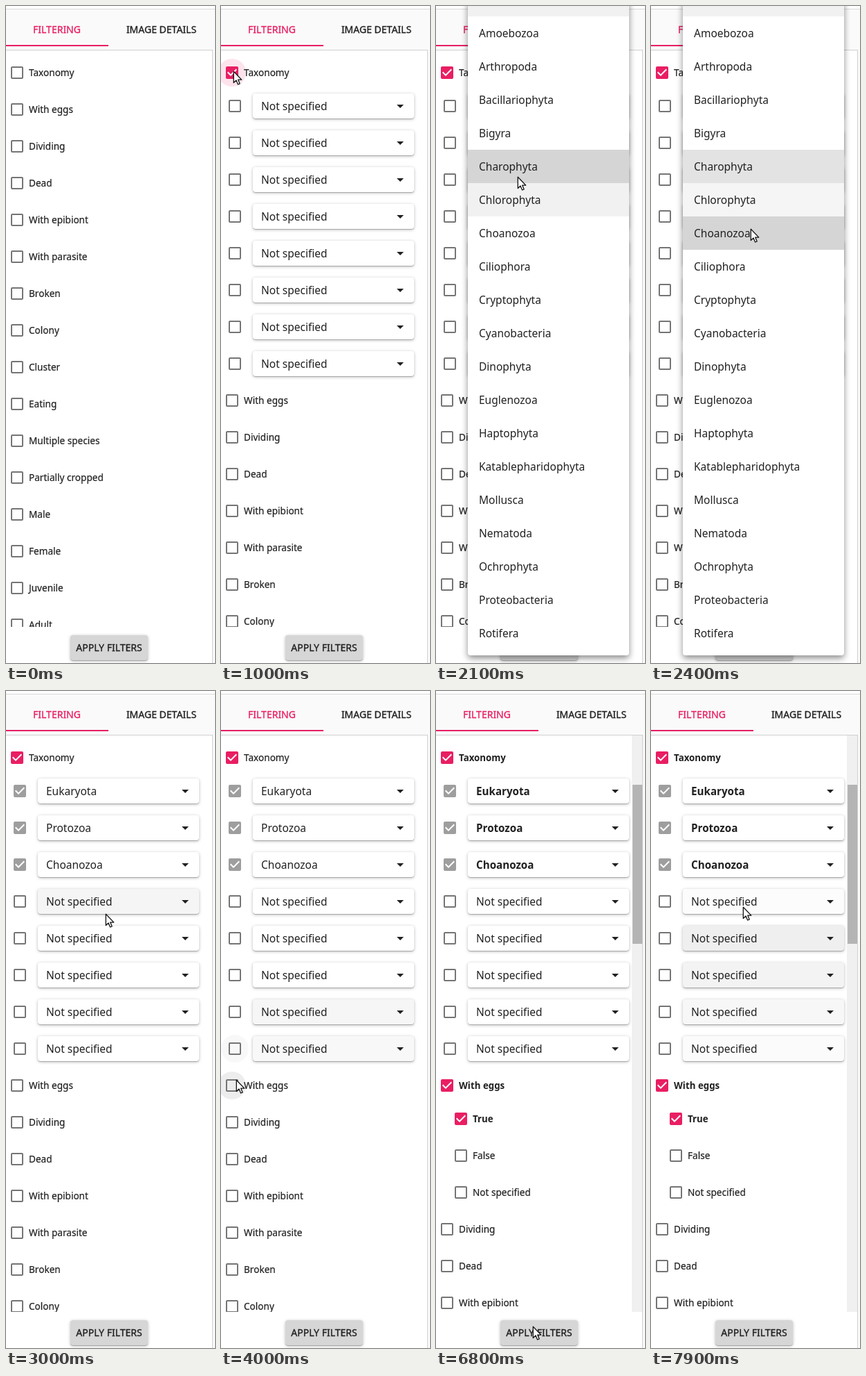
Animation, 302 px wide and 946 px high, one loop 8 s. Source, as an HTML page:

```html
<!DOCTYPE html>
<html lang="en">
<head>
<meta charset="utf-8">
<title>Filter panel</title>
<style>
  html, body { margin: 0; height: 100%; overflow: hidden; background: #fff; }
  svg { display: block; width: 100vw; height: 100vh; }
  text { font-family: "Noto Sans", "Open Sans", sans-serif; fill: #212121; white-space: pre; }
  .label { font-size: 13.6px; stroke: #212121; stroke-width: .2px; }
  .choice { font-size: 15.5px; }
  .label.bold { font-size: 13.3px; font-weight: 700; stroke: none; }
  .choice.bold { font-size: 15.2px; font-weight: 700; }
  .caps { font-size: 14px; font-weight: 500; text-anchor: middle; stroke: #212121; stroke-width: .35px; }
  .caps.on { fill: #e91e63; stroke: #e91e63; }
  .raised { filter: drop-shadow(0 1px .5px rgba(0,0,0,.2)) drop-shadow(0 1px 2px rgba(0,0,0,.28)); }
  .menu { filter: drop-shadow(0 4px 5px rgba(0,0,0,.45)); }
</style>
</head>
<body>
<svg id="stage" viewBox="0 0 302 946" preserveAspectRatio="none"></svg>
<script>
const LOOP = 8000, STEP = 100, PINK = '#e91e63';
const stage = document.getElementById('stage');

const filters = ['Taxonomy', 'With eggs', 'Dividing', 'Dead', 'With epibiont', 'With parasite',
  'Broken', 'Colony', 'Cluster', 'Eating', 'Multiple species', 'Partially cropped',
  'Male', 'Female', 'Juvenile', 'Adult'];
const answers = ['True', 'False', 'Not specified'];
const ranks = ['Eukaryota', 'Protozoa', 'Choanozoa'];
const phyla = ['Amoebozoa', 'Arthropoda', 'Bacillariophyta', 'Bigyra', 'Charophyta', 'Chlorophyta',
  'Choanozoa', 'Ciliophora', 'Cryptophyta', 'Cyanobacteria', 'Dinophyta', 'Euglenozoa', 'Haptophyta',
  'Katablepharidophyta', 'Mollusca', 'Nematoda', 'Ochrophyta', 'Proteobacteria', 'Rotifera'];

// Moments at which the state switches.
const at = { enter: 300, taxonomy: 1000, menu: 1850, chosen: 2985, eggs: 4300, yes: 4900,
  scrollbar: 6000, press: 6500, applied: 6800 };

// Pointer moves: from time, to time, x, y. It rests in between.
const moves = [
  [300, 800, 18, 94], [1400, 1550, 40, 112], [1550, 1600, 90, 186], [1600, 1800, 118, 262],
  [1850, 1960, 118, 246], [2260, 2300, 144, 321], [3400, 3700, 80, 490], [3700, 3780, 36, 520],
  [3780, 3880, 22, 525], [3880, 3940, 22, 560], [4600, 4800, 36, 614], [5000, 5100, 30, 664],
  [5300, 5450, 58, 720], [5900, 6200, 112, 913], [6400, 6500, 140, 915], [7300, 7600, 139, 574],
  [7720, 7900, 133, 311]];

const clamp = v => Math.max(0, Math.min(1, v));
const menuOpen = t => t >= at.menu && t < at.chosen;

function pointerAt(t) {
  let x = 170, y = 2;
  for (const [from, to, mx, my] of moves) {
    const k = clamp((t - from) / (to - from));
    x += (mx - x) * k;
    y += (my - y) * k;
  }
  return { t, x, y };
}

// Recent pointer positions; every hover fade follows from them.
const DT = 5;
let trail = [];
function follow(t) {
  trail = [];
  for (let s = Math.max(at.enter, t - 700); s < t; s += DT) trail.push(pointerAt(s));
}

const hover = (inside, fall = 400, rise = 60) =>
  trail.reduce((v, p) => clamp(v + (inside(p) ? DT / rise : -DT / fall)), 0);
const inRow = (p, y, h) => p.x >= 46 && p.x <= 279 && Math.abs(p.y - y) <= h / 2;

function grey(level) {
  const v = Math.round(255 - 42 * level);
  return `rgb(${v},${v},${v})`;
}

const rect = (x, y, w, h, fill, more = '') =>
  `<rect x="${x}" y="${y}" width="${w}" height="${h}" fill="${fill}" ${more}/>`;
const text = (x, y, str, cls, bold) => `<text x="${x}" y="${y}" class="${cls}${bold ? ' bold' : ''}">${str}</text>`;

function checkbox(x, y, fill) {
  const near = p => Math.hypot(p.x - x, p.y - y) < 23 && !menuOpen(p.t);
  const alpha = fill ? .12 * hover(near) : .07 * hover(near, 150);
  const halo = alpha ? `<circle cx="${x}" cy="${y}" r="20" fill="${fill || '#000'}" fill-opacity="${alpha}"/>` : '';
  return halo + (fill
    ? rect(x - 9, y - 9, 18, 18, fill, 'rx="2"') +
      `<path transform="translate(${x} ${y})" fill="#fff" d="M-2 5l-5-5 1.41-1.41L-2 2.17l7.59-7.59L7-4z"/>`
    : rect(x - 8, y - 8, 16, 16, 'none', 'rx="1" stroke="#757575" stroke-width="2"'));
}

const option = (x, y, str, checked, bold) =>
  checkbox(x, y, checked && PINK) + text(x + 17, y + 5.3, str, 'label', bold);

function select(i, y, t) {
  const set = t >= at.chosen && i < ranks.length;
  const tint = hover(p => inRow(p, y, 36) && !menuOpen(p.t) && p.t >= at.taxonomy);
  return checkbox(20, y, set && '#9e9e9e') +
    rect(46, y - 18, 233, 36, grey(tint), 'rx="4" class="raised"') +
    text(58, y + 5.7, set ? ranks[i] : 'Not specified', 'choice', set && t >= at.applied) +
    `<path d="M254 ${y - 2}h10l-5 5z" fill="#212121"/>`;
}

function list(t) {
  const applied = t >= at.applied;
  let out = '', y = 96;
  filters.forEach((name, i) => {
    const open = i === 0 ? t >= at.taxonomy : i === 1 && t >= at.eggs;
    out += option(16, y, name, open, open && applied);
    if (open) {
      y -= 5;
      if (i === 0) for (let k = 0; k < 8; k++) out += select(k, y += 53, t);
      else answers.forEach((s, k) => {
        const on = k === 0 && t >= at.yes;
        out += option(36, y += 53, s, on, on && applied);
      });
    }
    y += 53;
  });
  return out;
}

function menu(t) {
  if (!menuOpen(t)) return '';
  const rows = phyla.map((name, i) => {
    const y = 39 + 48 * i;
    const tint = hover(p => inRow(p, y, 48) && menuOpen(p.t));
    return rect(46, y - 24, 233, 48, grey(tint)) + text(62, y + 5.5, name, 'choice');
  }).join('');
  return `<g opacity="${t - at.menu < STEP ? .6 : 1}">` +
    rect(46, -20, 233, 955, '#fff', 'rx="4" class="menu"') +
    `<g clip-path="url(#sheet)">${rect(46, -20, 233, 35, '#f1f1f1')}${rows}</g></g>`;
}

function pointer(t) {
  if (t < at.enter) return '';
  const { x, y } = pointerAt(t);
  return `<path transform="translate(${x} ${y})" fill="#fff" stroke="#111" stroke-width="1.3"
    stroke-linejoin="round" d="M.3.3V16.5L4 13 6.6 19 9.2 17.9 6.7 12.1H11.8Z"/>`;
}

function draw(t) {
  follow(t);
  const pressed = t >= at.press && t < at.applied;
  stage.innerHTML =
    `<defs><clipPath id="list"><rect y="64" width="298" height="830"/></clipPath>
     <clipPath id="sheet"><rect x="46" y="-20" width="233" height="955" rx="4"/></clipPath></defs>` +
    rect(0, 0, 302, 946, '#fff') +
    rect(0, 4, 302, 1, '#d8d8d8') + rect(0, 5, 302, 58, '#fafafa') + rect(299, 63, 3, 883, '#fafafa') +
    rect(0, 63, 299, 1, '#d0d0d0') + rect(298, 63, 1, 883, '#d0d0d0') +
    text(73.5, 39.4, 'FILTERING', 'caps on') + text(224.5, 39.4, 'IMAGE DETAILS', 'caps') +
    rect(0, 56, 148, 2, PINK) +
    `<g clip-path="url(#list)">${list(t)}</g>` +
    (t >= at.scrollbar ? rect(283, 64, 15, 830, '#f0f0f0') + rect(284, 135, 14, 229, '#b4b4b4') : '') +
    rect(93, 906, 112, 36, pressed ? '#cdcdcd' : '#d6d6d6', 'rx="4" class="raised"') +
    text(149, 928.6, 'APPLY FILTERS', 'caps') +
    menu(t) + pointer(t);
}

let shown = -1;
const start = performance.now();
function tick() {
  const t = Math.floor((performance.now() - start) % LOOP / STEP) * STEP;
  if (t !== shown) draw(shown = t);
  requestAnimationFrame(tick);
}
tick();
</script>
</body>
</html>
```
